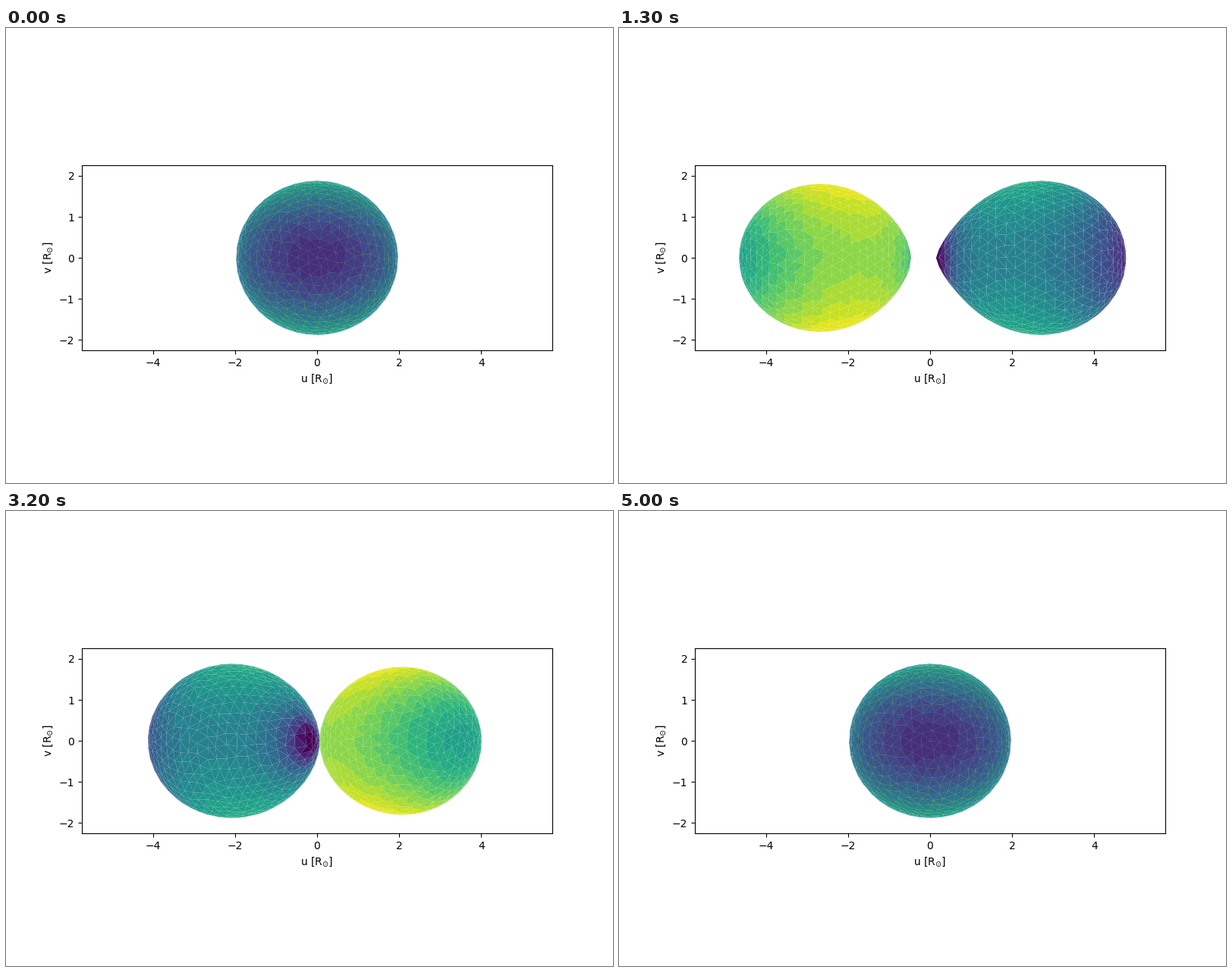
These frames come from a looping animation (800x600 px, 5.1 s). A matplotlib script:

```python
import numpy as np
import matplotlib.pyplot as plt
from matplotlib.animation import FuncAnimation
from matplotlib.collections import PolyCollection
from matplotlib.tri import Triangulation

FRAMES = 51
SMA = 5.3            # orbital separation in solar radii
TEFF_SPAN = 0.09     # relative temperature range covered by the colormap
CMAP = plt.get_cmap("viridis", 24)


def roche(p):
    """Roche potential for equal masses, companion at x = 1."""
    x, y, z = p.T
    r = np.sqrt(x**2 + y**2 + z**2)
    d = np.sqrt((1 - x)**2 + y**2 + z**2)
    return 1 / r + 1 / d - x + x**2 + y**2


def gravity(p):
    x, y, z = p.T
    r3 = (x**2 + y**2 + z**2)**1.5
    d3 = ((1 - x)**2 + y**2 + z**2)**1.5
    return np.column_stack([
        -x / r3 + (1 - x) / d3 - 1 + 2 * x,
        -y / r3 - y / d3 + 2 * y,
        -z / r3 - z / d3,
    ])


def directions(theta, phi):
    return np.column_stack([np.cos(theta),
                            np.sin(theta) * np.cos(phi),
                            np.sin(theta) * np.sin(phi)])


def surface(dirs, omega):
    """Points of the equipotential along unit vectors, by bisection."""
    lo, hi = np.full(len(dirs), 0.05), np.full(len(dirs), 0.5)
    for _ in range(45):
        mid = (lo + hi) / 2
        inside = roche(dirs * mid[:, None]) > omega
        lo, hi = np.where(inside, mid, lo), np.where(inside, hi, mid)
    return dirs * lo[:, None]


def build_mesh(omega, seed):
    """Rings of points marching from the inner tip to the back, triangulated."""
    rng = np.random.default_rng(seed)
    pole = surface(np.array([[0.0, 0.0, 1.0]]), omega)[0, 2]
    edge = 0.147 * pole

    theta = np.linspace(0, np.pi, 600)
    profile = surface(directions(theta, np.full(600, np.pi / 4)), omega)
    rho = np.hypot(profile[:, 1], profile[:, 2])
    steps = np.hypot(np.diff(profile[:, 0]), np.diff(rho))
    arc = np.concatenate([[0], np.cumsum(steps)])
    rings = int(round(arc[-1] / (edge * 0.866)))

    rows, phis = [0.0], [0.0]
    for k in range(1, rings):
        count = max(5, int(round(2 * np.pi * np.interp(k / rings * arc[-1], arc, rho) / edge)))
        turn = rng.random()
        jitter = rng.uniform(-0.13, 0.13, (2, count))
        rows.extend(k + jitter[0])
        phis.extend((np.arange(count) + turn + jitter[1]) * 2 * np.pi / count)
    rows, phis = np.array(rows), np.array(phis)

    # Planar Delaunay of the stereographic image, closed by a fan at the back.
    flat = np.tan(rows * np.pi / rings / 2)
    tri = Triangulation(flat * np.cos(phis), flat * np.sin(phis))
    back = len(rows)
    i, j = np.nonzero(tri.neighbors == -1)
    fan = np.column_stack([tri.triangles[i, (j + 1) % 3], tri.triangles[i, j],
                           np.full(len(i), back)])
    faces = np.vstack([tri.triangles, fan])

    theta = np.interp(np.append(rows, rings) / rings * arc[-1], arc, theta)
    return surface(directions(theta, np.append(phis, 0)), omega), faces, pole


def temperature(p, pole, other_pole, heating):
    """Gravity darkening plus heating by the companion, relative to the pole."""
    force = gravity(p)
    g = np.linalg.norm(force, axis=1)
    g_pole = np.linalg.norm(gravity(np.array([[0, 0, pole]])))
    to_other = np.array([1.0, 0, 0]) - p
    dist = np.linalg.norm(to_other, axis=1)
    cos = -(force * to_other).sum(axis=1) / (g * dist)
    size = 1.04 * other_pole / dist
    partial = np.clip(cos + size, 0, None)**2 / (4 * size)
    heat = size**2 * np.where(cos > size, cos, partial)
    return ((g / g_pole)**0.32 + heating * heat)**0.25


class Star:
    def __init__(self, ax, mesh, other_pole, level, heating, side):
        points, faces, pole = mesh
        self.side = side
        self.tris = points[faces] * SMA
        a, b, c = self.tris.transpose(1, 0, 2)
        normal = np.cross(b - a, c - a)
        outward = np.sign((normal * (a + b + c)).sum(axis=1))
        self.normals = normal * outward[:, None]
        teff = temperature(points, pole, other_pole, heating)[faces].mean(axis=1)
        self.colors = CMAP(np.clip(level + (teff - 1) / TEFF_SPAN, 0, 1))
        self.patches = PolyCollection([], edgecolors="none", linewidths=0)
        ax.add_collection(self.patches, autolim=False)

    def pose(self, angle):
        u0, w0 = self.side * np.sin(angle), self.side * np.cos(angle)
        x, y, z = np.moveaxis(self.tris, -1, 0)
        u = u0 * SMA / 2 - u0 * x - w0 * y
        w = -w0 * x + u0 * y
        facing = -w0 * self.normals[:, 0] + u0 * self.normals[:, 1]
        shown = np.nonzero(facing > 0)[0]
        shown = shown[np.argsort(w[shown].mean(axis=1))]
        self.patches.set_verts(np.stack([u, z], axis=-1)[shown])
        self.patches.set_facecolor(self.colors[shown])
        self.patches.set_zorder(1.5 + 0.4 * w0)


fig, ax = plt.subplots(figsize=(8, 6), dpi=100)
ax.set_aspect("equal")
ax.set_xlim(-5.73, 5.73)
ax.set_ylim(-2.25, 2.254)
ax.set_xticks([-4, -2, 0, 2, 4])
ax.set_yticks([-2, -1, 0, 1, 2])
ax.set_xlabel(r"u [$\mathrm{R_{\odot}}$]")
ax.set_ylabel(r"v [$\mathrm{R_{\odot}}$]")

big = build_mesh(3.763, 4)
small = build_mesh(3.885, 9)
stars = [Star(ax, big, small[2], level=0.59, heating=0.6, side=1),
         Star(ax, small, big[2], level=0.95, heating=0.47, side=-1)]


def draw(frame):
    angle = 2 * np.pi * frame / (FRAMES - 1)
    for star in stars:
        star.pose(angle)
    return [star.patches for star in stars]


anim = FuncAnimation(fig, draw, frames=FRAMES, interval=100, repeat=True)
plt.show()
```
